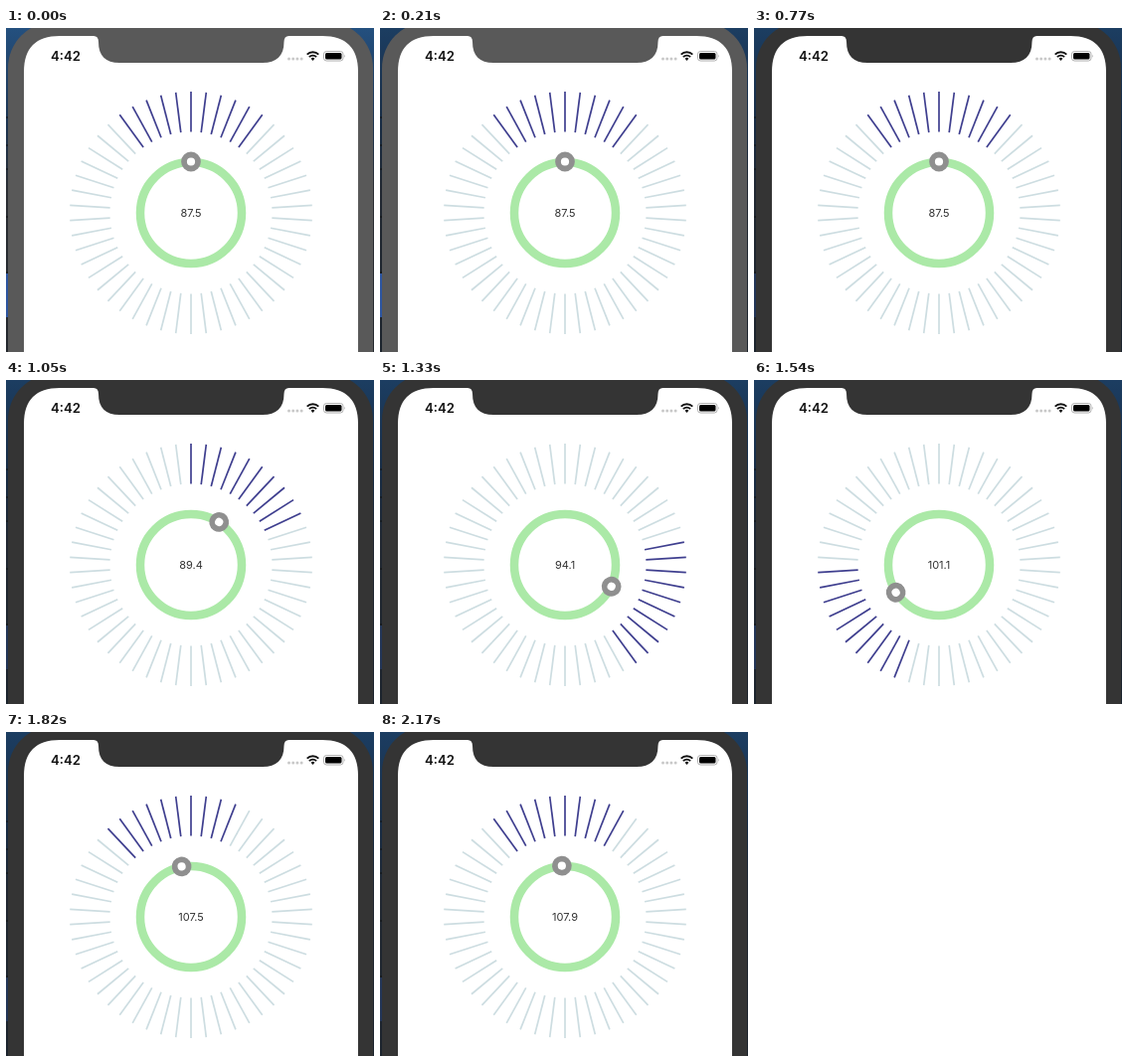
An HTML page that plays this animation: 370x326 px, repeating every 2590 ms.

```html
<!DOCTYPE html>
<html lang="en">
<head>
<meta charset="utf-8">
<title>Tuner dial</title>
<style>
  html, body { margin: 0; width: 100%; height: 100%; overflow: hidden; background: #1b3658; }
  svg { display: block; width: 370px; height: 326px; }
  text { font-family: Inter, Roboto, sans-serif; text-anchor: middle; }
  .tick { stroke: #cddde1; stroke-width: 1.7; }
  .tick.on { stroke: #3f3f8f; }
</style>
</head>
<body>
<svg viewBox="0 0 370 326">
  <defs>
    <linearGradient id="desk" x2="0" y2="1">
      <stop offset="0" stop-color="#24507f"/>
      <stop offset=".3" stop-color="#1d3450"/>
      <stop offset=".5" stop-color="#2b2e33"/>
      <stop offset="1" stop-color="#24282e"/>
    </linearGradient>
  </defs>
  <rect width="370" height="326" fill="url(#desk)"/>
  <rect id="shade" width="370" height="326" fill="#101c2e"/>
  <path d="M0 90h3M0 118h3M0 142h3M0 190h3M0 246h3" stroke="#111"/>
  <rect id="glow" y="247" width="3" height="44" fill="#2d55a0"/>
  <rect id="bezel" x="2" y="-6" width="367" height="400" rx="46"/>

  <path fill="#fff" d="M18 326V44C18 20 30 8 54 8H88Q93 8 93 14C93 28 100 35 114 35H258C272 35 279.500 28 279.500 14Q279.500 8 284.500 8H318C342 8 354 20 354 44V326Z"/>

  <text x="60" y="33" font-size="13.200" font-weight="600" fill="#111">4:42</text>
  <g fill="#c9c9c9">
    <circle cx="284.500" cy="31" r="1.500"/><circle cx="288.700" cy="31" r="1.500"/>
    <circle cx="292.900" cy="31" r="1.500"/><circle cx="297.100" cy="31" r="1.500"/>
  </g>
  <g fill="none" stroke="#111" stroke-width="1.900">
    <path d="M302.700 26.700a8 8 0 0 1 11.600 0M304.900 29.200a5 5 0 0 1 7.200 0"/>
    <path d="M306.600 30.700a2.700 2.700 0 0 1 3.800 0L308.500 33Z" fill="#111" stroke="none"/>
  </g>
  <rect x="319.500" y="23.500" width="19.500" height="9.500" rx="2.700" fill="none" stroke="#b0b0b0"/>
  <rect x="321" y="25" width="16.500" height="6.500" rx="1.500" fill="#000"/>
  <path d="M340.300 26.700q1.500 1.500 0 3z" fill="#aaa"/>

  <g transform="translate(186 186)">
    <g id="ticks"></g>
    <circle r="51" fill="none" stroke="#abe9a7" stroke-width="8.500"/>
    <g id="knob">
      <circle cy="-51.500" r="7" fill="#fff" stroke="#8f8f8f" stroke-width="5.800"/>
    </g>
    <text id="value" y="4" font-size="11" fill="#333"></text>
  </g>
</svg>
<script>
  const LOOP = 2590, STEP = 70, TICKS = 50, PITCH = 360 / TICKS;
  const DRAG_START = 840, FOCUS = 700;
  // Dial angle at each step of the drag, in degrees
  const drag = [0, 3, 14, 33.2, 43, 56, 80, 115, 181, 211, 237.4,
                266, 299, 331, 349.5, 354.5, 356.5];
  const $ = id => document.getElementById(id);

  const ticks = Array.from({ length: TICKS }, (_, i) => {
    const line = document.createElementNS('http://www.w3.org/2000/svg', 'line');
    line.setAttribute('y1', -81.5);
    line.setAttribute('y2', -122);
    line.setAttribute('transform', `rotate(${i * PITCH})`);
    $('ticks').append(line);
    return line;
  });

  function draw(time) {
    const step = Math.floor((time - DRAG_START) / STEP);
    const angle = drag[Math.max(0, Math.min(step, drag.length - 1))];
    const centre = angle / PITCH;

    ticks.forEach((line, i) => {
      const gap = Math.abs(i - centre);
      const near = Math.min(gap, TICKS - gap) <= 5;
      line.setAttribute('class', near ? 'tick on' : 'tick');
    });
    $('knob').setAttribute('transform', `rotate(${angle})`);
    $('value').textContent = (87.5 + angle / 360 * 20.6).toFixed(1);

    const focused = time >= FOCUS;
    $('bezel').setAttribute('fill', focused ? '#343434' : '#595959');
    $('shade').setAttribute('opacity', Math.min(Math.floor(time / STEP), 3) * 0.12);
    $('glow').setAttribute('opacity', focused ? 0.35 : 1);
  }

  const start = performance.now();
  function frame() {
    draw((performance.now() - start) % LOOP);
    requestAnimationFrame(frame);
  }
  frame();
</script>
</body>
</html>
```
